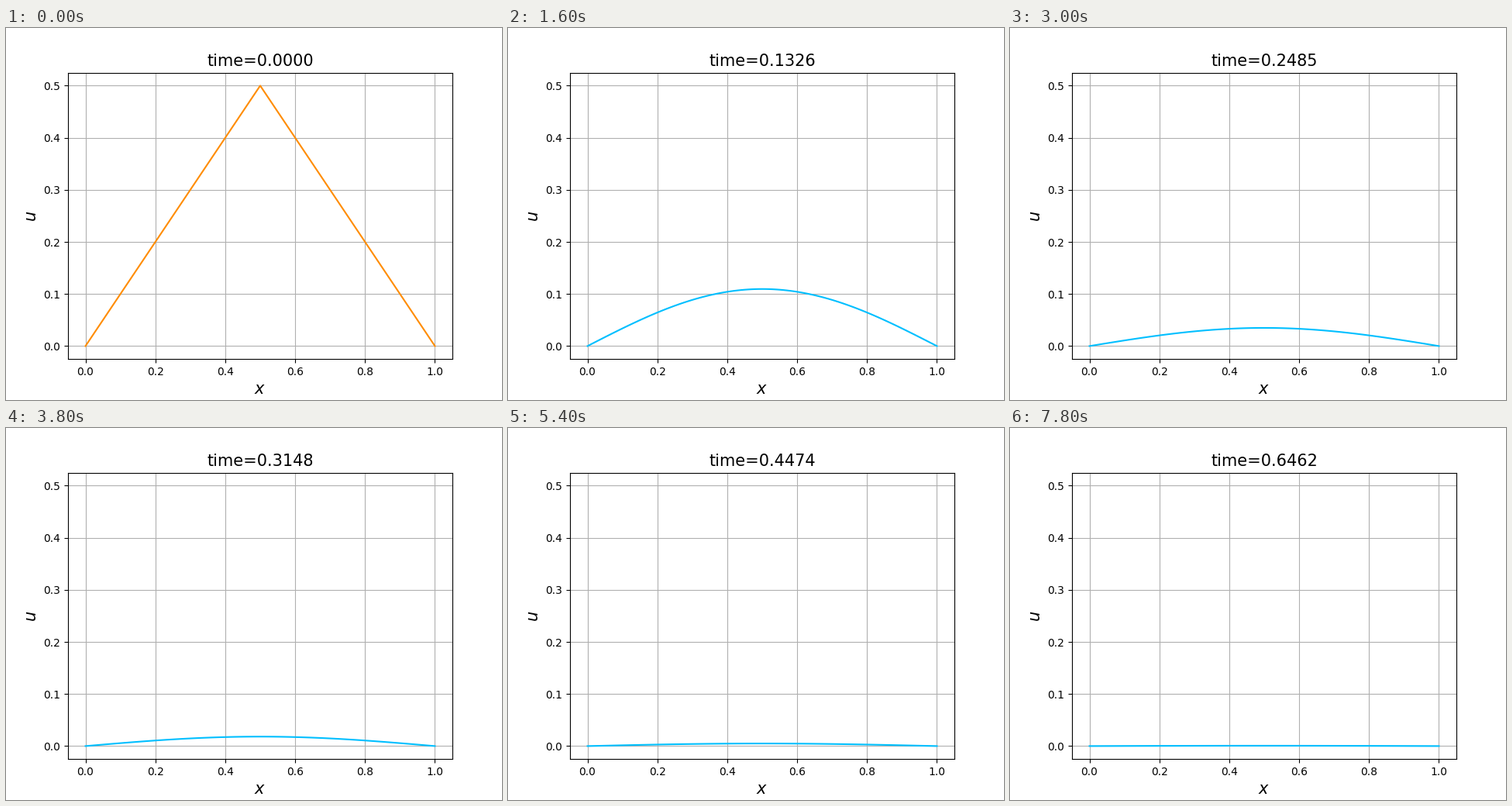
A matplotlib script that plays this animation: 640 by 480 pixels, repeating every 8000 ms.

```python
import numpy as np
import matplotlib.pyplot as plt
from matplotlib.animation import FuncAnimation

FRAMES = 40
INTERVAL = 200
DT = 0.016569  # simulated time per frame

x = np.linspace(0, 1, 101)


def heat(t):
    """Triangle profile diffusing between two cold ends (Fourier series)."""
    if t == 0:
        return np.minimum(x, 1 - x)
    n = np.arange(1, 60, 2)[:, None]
    amp = 4 / (np.pi * n) ** 2 * np.sin(n * np.pi / 2)
    return (amp * np.sin(n * np.pi * x) * np.exp(-(n * np.pi) ** 2 * t)).sum(axis=0)


fig, ax = plt.subplots(figsize=(6.4, 4.8), dpi=100)
ax.set_xlim(-0.05, 1.05)
ax.set_ylim(-0.025, 0.525)
ax.set_xlabel("$x$", fontsize=15)
ax.set_ylabel("$u$", fontsize=15)
ax.grid(True)
title = ax.set_title("", fontsize=15)
line, = ax.plot(x, heat(0))


def draw(i):
    t = i * DT
    line.set_ydata(heat(t))
    line.set_color("deepskyblue" if i else "darkorange")
    title.set_text(f"time={t:.4f}")
    return line, title


anim = FuncAnimation(fig, draw, frames=FRAMES, interval=INTERVAL,
                     init_func=lambda: draw(0), repeat=True, repeat_delay=0)
plt.show()
```
